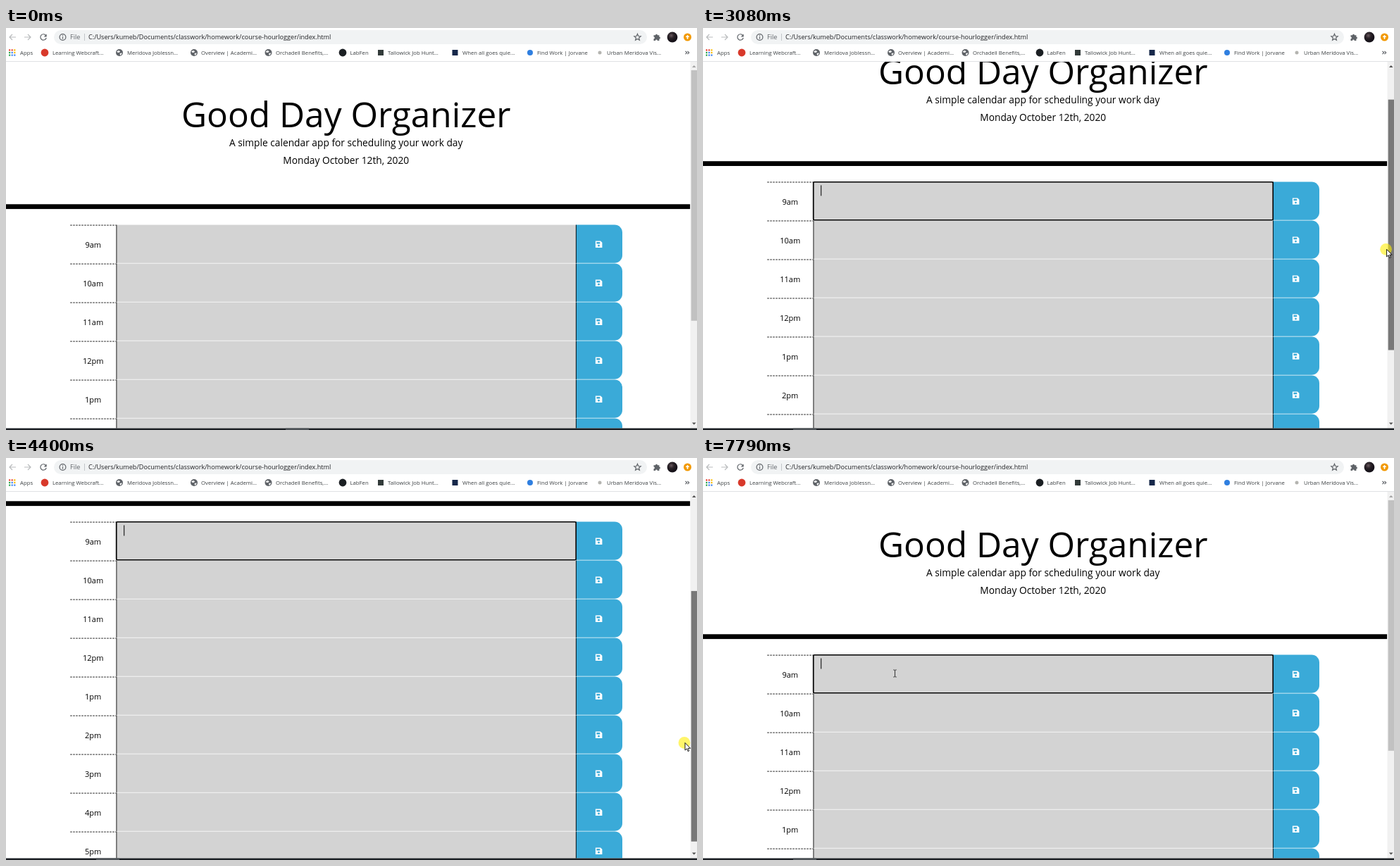
Recreate the animation shown at these times as an HTML page. Size 981 px wide and 571 px high, loop 8000 ms.

```html
<!DOCTYPE html>
<html lang="en">
<head>
<meta charset="utf-8">
<title>Day organizer</title>
<style>
  html, body { margin: 0; width: 100%; height: 100%; overflow: hidden; background: #fff; }
  svg { display: block; width: 981px; height: 571px; }
  text { font-family: "Open Sans", "Noto Sans", sans-serif; fill: #000; }
  .bar text { font-size: 7.75px; fill: #3c4043; }
  .bar .url { font-size: 9.1px; fill: #202124; }
  .mid { text-anchor: middle; }
  .line { fill: none; stroke: #5f6368; stroke-width: 1.2; }
  .faint { stroke: #b9bbbd; }
</style>
</head>
<body>
<svg viewBox="0 0 981 571">
  <defs>
    <clipPath id="view"><rect y="48" width="971.5" height="520.5"/></clipPath>
    <radialGradient id="avatar" cx=".4" cy=".35">
      <stop offset="0" stop-color="#6a5a60"/><stop offset=".5" stop-color="#2c2429"/><stop offset="1" stop-color="#17131a"/>
    </radialGradient>
    <g id="globe">
      <circle r="5" fill="#5f6368"/>
      <path d="M-3.8-1.2q2.2-2.6 4-1.2t-.8 2.2q-2 .6-3.2-1zM.6 1q2.6-1 3.2-.4-.8 2.8-2.8 3.2z" fill="#fff"/>
    </g>
    <g id="disk">
      <path d="M-4.6-4.7H2.6L4.9-2.4V4.7H-4.6z" fill="#fff"/>
      <path d="M-3.1-3.3H1.8V-.8H-3.1z" fill="#3aaad8"/>
      <circle cy="2" r="1.4" fill="#3aaad8"/>
    </g>
  </defs>

  <rect width="981" height="571" fill="#fff"/>

  <g clip-path="url(#view)">
    <g id="page">
      <text class="mid" x="482.7" y="141" font-size="49.5">Good Day Organizer</text>
      <g class="mid" font-size="13.75">
        <text x="482.7" y="168">A simple calendar app for scheduling your work day</text>
        <text x="482.7" y="193">Monday October 12th, 2020</text>
      </g>
      <rect y="250.3" width="971.5" height="6.8"/>
      <g id="rows"></g>
      <g id="focus">
        <rect x="156.6" y="279.8" width="652.6" height="54" rx="1.5" fill="none" stroke="#000" stroke-width="1.5"/>
        <rect id="caret" x="167.2" y="284.5" width="1" height="15"/>
      </g>
    </g>
  </g>

  <g class="bar">
    <rect width="981" height="48" fill="#fff"/>
    <rect y="47" width="981" height="1" fill="#dfe1e4"/>
    <rect x="68" y="3" width="842" height="20" rx="10" fill="#f1f3f4"/>
    <path class="line faint" d="M14 13H5M9 9L5 13 9 17M26 13H35M31 9L35 13 31 17"/>
    <path class="line" d="M56.6 10.6A4.2 4.2 0 1 0 57.2 14"/>
    <path d="M57.7 8.4V12.4H53.7z" fill="#5f6368"/>
    <circle class="line" cx="80.5" cy="13" r="4.4" stroke-width="1"/>
    <path class="line" d="M80.5 12.4V15.6M80.5 10.3V11.5"/>
    <text class="url" x="91" y="16.3" style="fill:#5f6368">File</text>
    <rect x="111" y="8" width="1" height="10" fill="#c2c5c9"/>
    <text class="url" x="117" y="16.3">C:/Users/kumeb/Documents/classwork/homework/course-hourlogger/index.html</text>
    <path class="line" stroke-width="1" d="M896.5 8.4L897.8 11.5 901.2 11.8 898.6 14 899.4 17.3 896.5 15.5 893.6 17.3 894.4 14 891.8 11.8 895.2 11.5z"/>
    <path d="M919.5 10.2H922A1.5 1.5 0 0 1 925 10.2H927.4V12.6A1.5 1.5 0 0 1 927.4 15.6V18H924.8A1.4 1.4 0 0 0 922 18H919.5V15.4A1.4 1.4 0 0 0 919.5 12.6z" fill="#5f6368"/>
    <circle cx="946" cy="13" r="7.4" fill="url(#avatar)"/>
    <circle cx="967.5" cy="13" r="5.5" fill="#f29900"/>
    <path d="M967.5 9.8L970.4 13H968.4V15.8H966.6V13H964.6z" fill="#fff"/>
    <g id="marks"></g>
    <text x="20" y="38">Apps</text>
    <path class="line" stroke-width="1" d="M964.5 32.8L966.7 35 964.5 37.2M967.5 32.8L969.7 35 967.5 37.2"/>
  </g>

  <rect x="971.5" y="48" width="9.5" height="520.5" fill="#f1f1f1"/>
  <path id="up" d="M974 56L976.8 53 979.6 56z"/>
  <path id="down" d="M974 560.5L976.8 563.5 979.6 560.5z"/>
  <rect id="thumb" x="972.7" y="60" width="8.3" height="355.8"/>
  <rect y="568.5" width="981" height="2.5" fill="#1c2025"/>
  <rect id="task" y="568.5" width="33" height="2.5" fill="#4d5257"/>

  <circle id="halo" r="8.4" fill="#ffee00" fill-opacity=".58"/>
  <path id="arrow" d="M0 0V10.6L2.5 8.4 4.2 12.2 5.8 11.5 4.2 7.8H7.6z" fill="#fff" stroke="#000" stroke-width=".9"/>
  <path id="beam" d="M-2.2-5H-.5L0-4.5.5-5H2.2M0-4.5V4.5M-2.2 5H-.5L0 4.5.5 5H2.2" fill="none" stroke="#222" stroke-width=".9"/>
</svg>

<script>
  const $ = id => document.getElementById(id);

  // Page rows
  const hours = ["9am", "10am", "11am", "12pm", "1pm", "2pm", "3pm", "4pm", "5pm"];
  $("rows").innerHTML = hours.map((hour, i) => {
    const y = 279.6 + i * 55;
    return `<g transform="translate(0 ${y})">
      <path d="M91.2 .5H156.5" stroke="#222" stroke-dasharray="2.6 1.4"/>
      <text class="mid" x="123.7" y="32.3" font-size="11">${hour}</text>
      <rect x="157" width="652" height="54.2" fill="#d3d3d3"/>
      <path d="M809 0H864A11 11 0 0 1 875 11V43.2A11 11 0 0 1 864 54.2H809z" fill="#3aaad8"/>
      <path d="M156.9 0V54.6M809.4 0V54.6" stroke="#000" stroke-width=".9"/>
      <use href="#disk" x="841.5" y="27.6"/>
    </g>`;
  }).join("");

  // Bookmarks: icon centre, text start, label, icon
  const dot = (color, r) => x => `<circle cx="${x}" cy="35" r="${r}" fill="${color}"/>`;
  const box = (color, r) => x => `<rect x="${x - r}" y="${35 - r}" width="${2 * r}" height="${2 * r}" fill="${color}"/>`;
  const globe = x => `<use href="#globe" x="${x}" y="35"/>`;
  const marks = [
    [55, 66, "Learning Webcraft...", dot("#d8392b", 5.4)],
    [161, 172, "Meridova Joblessn...", globe],
    [267, 277, "Overview | Academi...", globe],
    [372.5, 383, "Orchadell Benefits,...", globe],
    [478, 488.5, "LabFen", dot("#1b1f23", 5.4)],
    [532, 542, "Tallowick Job Hunt...", box("#333b3a", 4)],
    [637.5, 648, "When all goes quie...", box("#16284a", 4)],
    [744, 754, "Find Work | Jorvane", dot("#2f7fe0", 4)],
    [843, 853, "Urban Meridova Vis...", dot("#b4b4b0", 2.5)]
  ];
  const appColors = ["#ea4335", "#ea4335", "#fbbc04", "#34a853", "#4285f4", "#fbbc04", "#34a853", "#4285f4", "#4285f4"];
  $("marks").innerHTML =
    appColors.map((c, i) => `<rect x="${4 + i % 3 * 3.6}" y="${30.3 + Math.floor(i / 3) * 3.6}" width="2.2" height="2.2" fill="${c}"/>`).join("") +
    marks.map(([ix, tx, label, icon]) => icon(ix) + `<text x="${tx}" y="38">${label}</text>`).join("");

  // Motion
  const LOOP = 8000, STEP = 77.2, MAX = 207;
  const scrollKeys = [[2080, 0], [2620, 25.4], [3466, 90], [4400, 189], [4550, MAX], [4850, MAX], [5249, 72], [5440, 18], [5640, 0]];
  const mouseKeys = [
    [463, 950, 590], [540, 951, 562], [720, 964, 390], [910, 975, 288], [1100, 975, 288],
    [1310, 957, 277], [1540, 978, 271], [1690, 978.4, 272], [1770, 978, 272.5], [2080, 978, 272.5],
    [2620, 975, 290], [3466, 967, 334], [4400, 964, 404.5], [4550, 962, 418], [4770, 961.5, 428],
    [4850, 961.5, 428], [5249, 981.5, 302], [5500, 984, 262], [5720, 984, 262],
    [6000, 830, 300], [6300, 420, 318], [6550, 272, 307.5], [6700, 272.5, 306]
  ];

  function at(keys, t) {
    const n = keys.findIndex(k => k[0] > t);
    if (n === 0) return keys[0].slice(1);
    if (n < 0) return keys[keys.length - 1].slice(1);
    const a = keys[n - 1], b = keys[n], p = (t - a[0]) / (b[0] - a[0]);
    return a.slice(1).map((v, i) => v + (b[i + 1] - v) * p);
  }

  const within = (t, a, b) => t >= a && t < b;
  const show = (id, on) => $(id).setAttribute("visibility", on ? "visible" : "hidden");
  const move = (id, x, y) => $(id).setAttribute("transform", `translate(${x.toFixed(2)} ${y.toFixed(2)})`);
  const fill = (id, color) => $(id).setAttribute("fill", color);

  function draw(t) {
    const q = 540 + Math.floor((t - 515) / STEP) * STEP;
    const [scroll] = at(scrollKeys, q);
    const [x, y] = at(mouseKeys, q);
    const drag = within(t, 2070, 5775);
    const click = within(t, 6625, 6865);
    const overText = x > 157 && x < 809 && y > 280;
    const overBar = x > 971.5 && x < 981 && y < 416 && t < 2080;

    move("page", 0, -scroll);
    move("thumb", 0, scroll * .682);
    fill("thumb", drag ? "#787878" : overBar ? "#a8a8a8" : "#c1c1c1");
    fill("up", scroll > 0 ? "#505050" : "#a3a3a3");
    fill("down", scroll < MAX ? "#505050" : "#a3a3a3");
    $("task").setAttribute("x", t < 2145 ? 397 : 128);

    show("focus", t >= 2070);
    show("caret", t >= 2070 && !within(t, 6000, 6520) && !within(t, 7325, 7785));
    show("halo", drag || click);
    show("arrow", !overText);
    show("beam", overText);
    move("halo", x - 1, y);
    move("arrow", x, y);
    move("beam", x, y);
  }

  const start = performance.now();
  function tick() {
    draw((performance.now() - start) % LOOP);
    requestAnimationFrame(tick);
  }
  tick();
</script>
</body>
</html>
```
